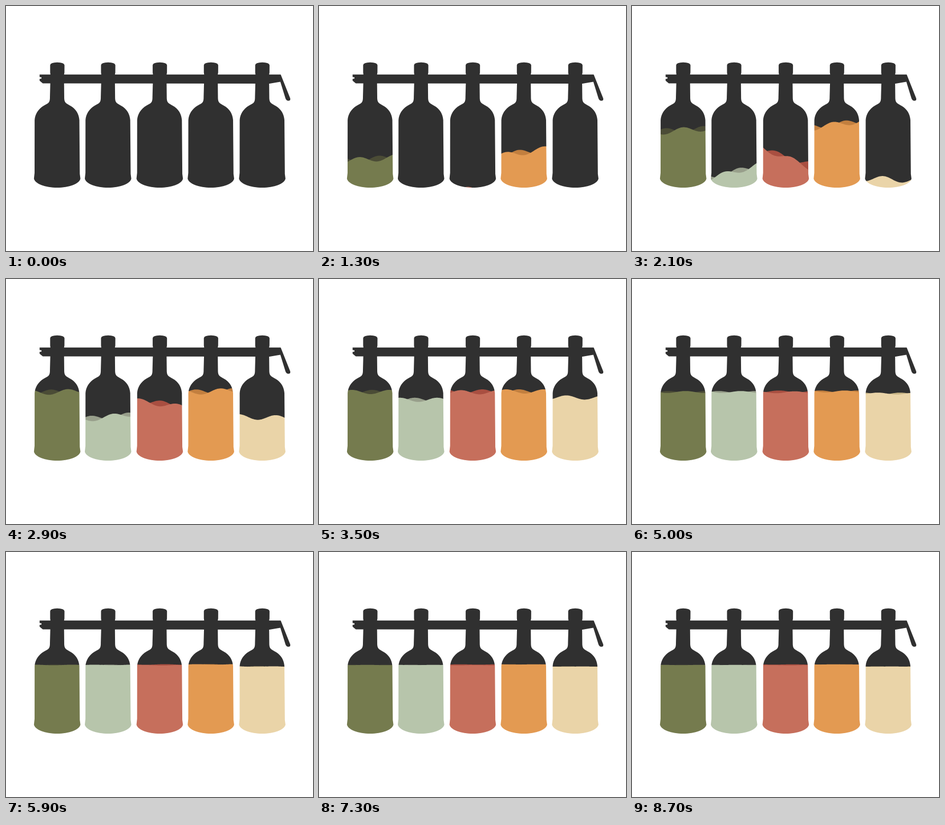
Recreate the animation shown at these times as an HTML page with a canvas. Size 580 px wide and 464 px high, loop 8800 ms.

```html
<!DOCTYPE html>
<html lang="en">
<head>
<meta charset="utf-8">
<title>Filling bottles</title>
<style>
  html, body { margin: 0; width: 100%; height: 100%; overflow: hidden; background: #fff; }
  canvas { display: block; }
</style>
</head>
<body>
<canvas id="stage" width="580" height="464"></canvas>
<script>
const ctx = document.getElementById('stage').getContext('2d');
const LOOP = 8800, STEP = 100;
const DARK = '#303030';
const EMPTY_LEVEL = 348, WAVELENGTH = 70;

// Rising starts at `start`; `crest` is the wave crest's x at 2100 ms, moving `speed` px/ms.
// The back wave is shifted by `shift`, raised by `lift` and delayed by `lag`.
const bottles = [
  { x: 96.8, front: '#757b4e', back: '#4b4c36', start: 601, rise: 1975, full: 214,
    crest: 96, speed: .026, shift: 38, tilt: -.08, lift: 0, lag: 0 },
  { x: 192.9, front: '#b7c5ab', back: '#989f8b', start: 1640, rise: 2279, full: 214,
    crest: 174, speed: .035, shift: 28, tilt: -.36, lift: 0, lag: 0 },
  { x: 290.5, front: '#c66f5c', back: '#a94f41', start: 1300, rise: 2133, full: 214.5,
    crest: 302, speed: .026, shift: 40, tilt: .42, lift: 1.5, lag: 0 },
  { x: 387.2, front: '#e39a52', back: '#c27f3f', start: 464, rise: 1914, full: 213,
    crest: 379, speed: .032, shift: 24, tilt: -.15, lift: 0, lag: 0 },
  { x: 484.2, front: '#ead4a8', back: '#c7b484', start: 1882, rise: 1818, full: 217,
    crest: 474, speed: .045, shift: 42, tilt: .08, lift: 0, lag: 150 }
];

const bottlePath = new Path2D(
  'M-13.4 112 Q-13 107 0 106.8 Q13 107 13.7 112 L13.6 126 Q12.6 129 12.8 135 L13.2 172' +
  ' C13 184 17 184 24 188.5 C36 195 41 205 41.8 216 L42.6 318 L43.8 327' +
  ' C42 337 22 343.9 0 344 C-22 343.9 -42 337 -44 327 L-42.8 316 L-42.7 216' +
  ' C-42 205 -36 195 -25 188.5 C-17 184 -13.6 184 -13.8 172 L-12.8 135 Q-12.6 129 -13.4 126 Z');
const rackPath = new Path2D(
  'M63.5 129.8 H519 L537 175 Q538 179.5 533 179.6 Q529.5 179 528 175 L518.3 143.5' +
  ' L498 147 L69.5 146.5 L63.5 141.5 V138 L67 137.5 V135 L63.5 134.5 Z');

const clamp = v => Math.max(0, Math.min(1, v));

function drawLiquid(b, t, isBack) {
  const p = clamp((t - b.start - (isBack ? b.lag : 0)) / b.rise);
  if (p === 0 && t < b.start) return;
  const level = b.full + (EMPTY_LEVEL - b.full) * (1 - p) ** 1.3 - (isBack ? b.lift : 0);
  const amplitude = Math.max(.3, Math.min(5.5, (6300 - t) / 700));
  const crest = b.crest + b.speed * (t - 2100) + (isBack ? b.shift : 0);
  const slope = b.tilt * clamp((3300 - t) / 1200) * clamp(p / .25) * (isBack ? .7 : 1);

  ctx.beginPath();
  ctx.moveTo(b.x - 47, 350);
  for (let dx = -47; dx <= 47; dx++) {
    const wave = Math.cos((b.x + dx - crest) * 2 * Math.PI / WAVELENGTH);
    ctx.lineTo(b.x + dx, level + slope * dx - amplitude * wave);
  }
  ctx.lineTo(b.x + 47, 350);
  ctx.fillStyle = isBack ? b.back : b.front;
  ctx.fill();
}

function draw(t) {
  ctx.globalCompositeOperation = 'source-over';
  ctx.clearRect(0, 0, 580, 464);
  ctx.fillStyle = DARK;
  ctx.fill(rackPath);
  for (const b of bottles) {
    ctx.save();
    ctx.translate(b.x, 0);
    ctx.fill(bottlePath);
    ctx.restore();
  }
  // Liquid only colours pixels the bottles already cover.
  ctx.globalCompositeOperation = 'source-atop';
  for (const b of bottles) {
    drawLiquid(b, t, true);
    drawLiquid(b, t, false);
  }
}

function tick() {
  const t = performance.now() % LOOP;
  draw(Math.floor(t / STEP) * STEP);
  requestAnimationFrame(tick);
}
tick();
</script>
</body>
</html>
```
